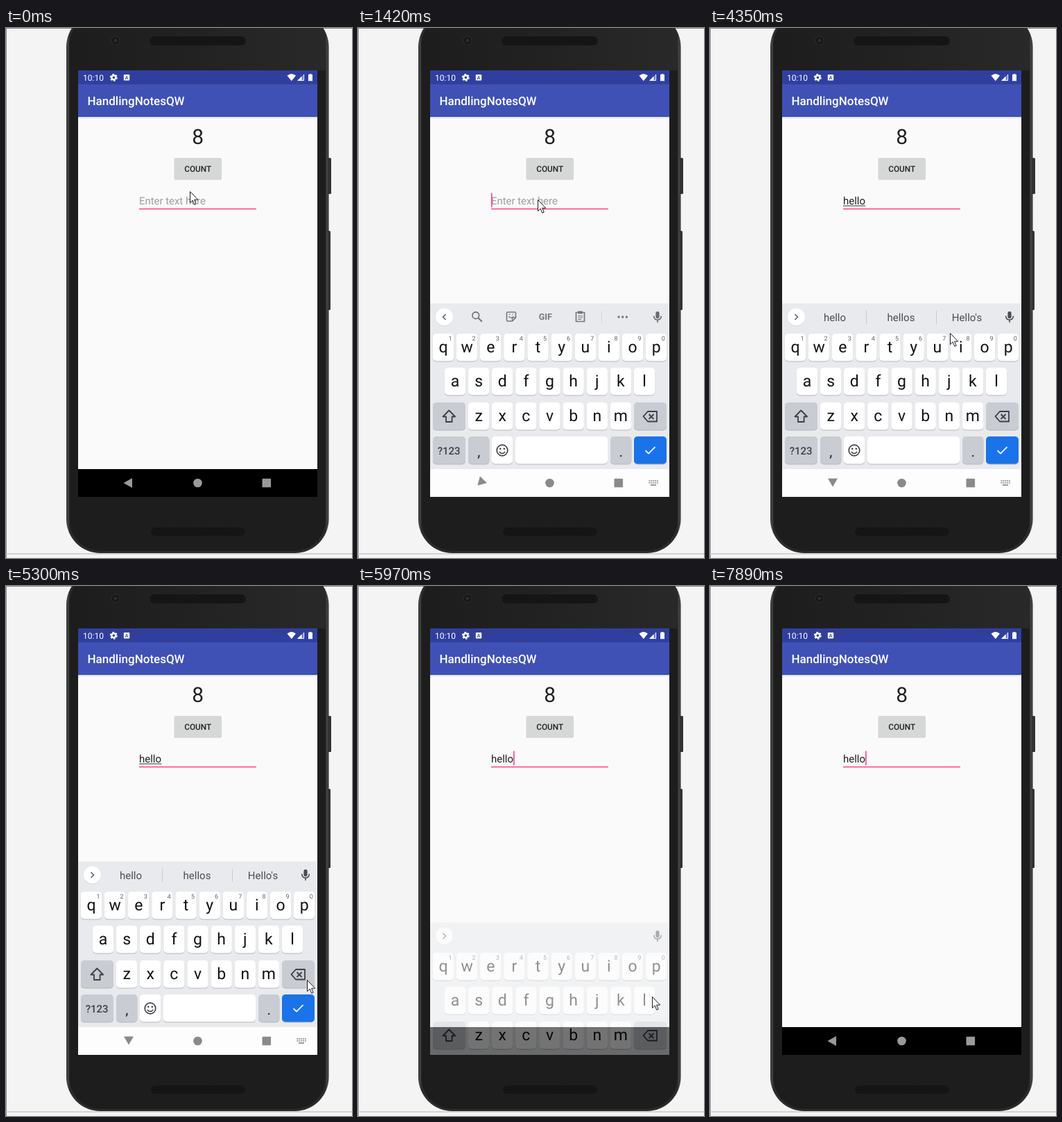
Write an HTML page that moves like this. It is 499 by 763 pixels and loops after 7990 ms.

```html
<!DOCTYPE html>
<html lang="en">
<head>
<meta charset="utf-8">
<title>Text entry on a phone</title>
<style>
  html, body { margin: 0; width: 100%; height: 100%; overflow: hidden; background: #f4f4f4; }
  svg { display: block; width: 499px; height: 763px; }
  text { font-family: Roboto, "Noto Sans", sans-serif; text-rendering: geometricPrecision; white-space: pre; }
  .mid { text-anchor: middle; }
  .bold { font-weight: 500; }
  .line { fill: none; stroke-linejoin: round; }
</style>
</head>
<body>
<svg viewBox="0 0 499 763" xmlns="http://www.w3.org/2000/svg">
  <defs>
    <linearGradient id="shell" x1="0" y1="0" x2="1" y2="0">
      <stop offset="0" stop-color="#2b2d2d"/>
      <stop offset=".006" stop-color="#454848"/>
      <stop offset=".012" stop-color="#2a2c2c"/>
      <stop offset=".988" stop-color="#2a2c2c"/>
      <stop offset=".994" stop-color="#454848"/>
      <stop offset="1" stop-color="#2b2d2d"/>
    </linearGradient>
    <linearGradient id="face" x1="0" y1="0" x2="1" y2="0">
      <stop offset="0" stop-color="#1d1d1d"/>
      <stop offset=".4" stop-color="#212121"/>
      <stop offset="1" stop-color="#292929"/>
    </linearGradient>
    <linearGradient id="drop" x1="0" y1="0" x2="0" y2="1">
      <stop offset="0" stop-color="#000" stop-opacity=".12"/>
      <stop offset="1" stop-color="#000" stop-opacity="0"/>
    </linearGradient>
    <pattern id="mesh" width="4" height="4" patternUnits="userSpaceOnUse">
      <rect width="4" height="4" fill="#1b1b1b"/>
      <circle cx="1" cy="1" r=".9" fill="#080808"/>
      <circle cx="3" cy="3" r=".9" fill="#080808"/>
    </pattern>
    <clipPath id="screen"><rect x="104" y="61" width="345" height="614"/></clipPath>
  </defs>

  <rect width="499" height="763" fill="#f4f4f4"/>
  <path d="M0 .5H499M.5 0V763" stroke="#8c8c8c"/>
  <path d="M0 757H499" stroke="#c9c9c9" stroke-width="1.5"/>

  <g id="phone">
    <rect x="463" y="187" width="6" height="52" rx="1.5" fill="#333"/>
    <rect x="463" y="292" width="5" height="114" rx="1.5" fill="#333"/>
    <rect x="87" y="-22" width="378.5" height="778" rx="49" fill="url(#shell)"/>
    <rect x="91.5" y="-18" width="369.5" height="771" rx="45" fill="#1d1d1d"/>
    <path d="M91.5 61V22Q92 10 99 0H454Q461 10 461 22V61Z" fill="url(#face)"/>
    <rect x="207" y="12" width="139" height="13" rx="6.5" fill="url(#mesh)"/>
    <rect x="209" y="719" width="136" height="12" rx="6" fill="url(#mesh)"/>
    <circle cx="158" cy="18" r="6" fill="#161616" stroke="#303030"/>
    <circle cx="158" cy="18" r="2.5" fill="#2b2d31"/>
  </g>

  <g clip-path="url(#screen)">
    <rect x="104" y="61" width="345" height="614" fill="#fafafa"/>
    <rect x="104" y="128" width="345" height="3" fill="url(#drop)"/>
    <rect x="104" y="61" width="345" height="20" fill="#303f9f"/>
    <rect x="104" y="81" width="345" height="47" fill="#3f51b5"/>

    <g fill="#fff">
      <text x="111" y="76" font-size="12">10:10</text>
      <circle cx="155.3" cy="71.3" r="3" fill="none" stroke="#fff" stroke-width="2.4"/>
      <circle cx="155.3" cy="71.3" r="4.6" fill="none" stroke="#fff" stroke-width="1.8" stroke-dasharray="2.41 2.41"/>
      <rect x="169.8" y="67" width="8.4" height="8.4" rx="1"/>
      <text class="mid bold" x="174" y="74" font-size="7.5" fill="#303f9f">A</text>
      <path d="M405.5 68.6Q411.8 63.6 418 68.6L411.8 76.2Z"/>
      <path d="M430 66V76H420Z" opacity=".35"/>
      <path d="M426.5 69.5V76H420Z"/>
      <path class="line" d="M429.6 67V75.6H421" stroke="#fff" stroke-width=".9"/>
      <path d="M437.6 66H440.4V67H442V76.2H436V67H437.6Z"/>
      <text class="bold" x="117.5" y="111" font-size="17">HandlingNotesQW</text>
    </g>

    <text class="mid" x="276.7" y="167" font-size="30" fill="#212121">8</text>
    <rect x="242.5" y="187.5" width="68.5" height="31" rx="2" fill="#000" opacity=".16"/>
    <rect x="243" y="187" width="67.5" height="30" rx="1.5" fill="#d6d7d7"/>
    <text class="mid bold" x="276.7" y="207" font-size="11.8" fill="#212121">COUNT</text>

    <text id="hint" x="192" y="254" font-size="14.9" fill="#9c9c9c">Enter text here</text>
    <text id="entry" x="192" y="254" font-size="15" fill="#212121"></text>
    <path id="compose" stroke="#333" stroke-width="1"/>
    <path d="M192 260.5H361" stroke="#ff4081" stroke-width="1.3"/>
    <rect id="caret" y="237.5" width="1.6" height="20.5" fill="#ff4081"/>

    <rect x="104" y="635" width="345" height="40" fill="#000"/>
    <g id="darkNav" fill="#9a9a9a"></g>
    <g id="board"></g>
  </g>
  <path id="mouse" d="M.5 .5V16.6L4.2 13.1L6.8 19.3L9.2 18.2L6.6 12.2H11.7Z" fill="#fff" stroke="#1c1c28" stroke-width="1" stroke-linejoin="round"/>
</svg>

<script>
const LOOP = 7990;
const $ = id => document.getElementById(id);
const show = (id, on) => $(id).setAttribute('display', on ? 'inline' : 'none');

// Held values: each entry is [start time, ...value].
const mousePath = [
  [0, 265, 235], [120, 259, 247],
  [4350, 346, 439], [4500, 373, 478], [4630, 404, 524], [4750, 425, 555], [4870, 434, 567],
  [5420, 424, 591],
  [6680, 400, 616], [6800, 410, 634], [6930, 428, 662], [7060, 449, 695],
  [7180, 470, 727], [7300, 488, 750], [7490, 520, 790]
];
const caretOn = [
  [0, 0], [490, 1], [990, 0], [1150, 1], [2000, 0], [2280, 1], [4350, 0], [4870, 1],
  [5300, 0], [5700, 1], [6370, 0], [6890, 1], [7390, 0], [7890, 1]
];
const typed = [[0, ''], [2280, 'h'], [2420, 'he'], [2700, 'hel'], [3260, 'hell'], [3540, 'hello']];
const words = [
  [0], [2420, 'he', 'hi', 'hey'], [2700, 'he', 'hey', 'hello'], [2950, 'hel', 'help', 'hello'],
  [3790, 'hello', 'hellos', 'Hello\'s'], [5700, '', '', '']
];
// Keyboard drop in px and opacity.
const slide = [[0, 280, 0], [1150, 170, .28], [1280, 87.5, .68], [1420, 0, 1], [5940, 88, .45], [6090, 280, 0]];
const backTurn = [[0, 0], [1420, -45], [1540, -90]];

function held(track, t) {
  let now = track[0];
  for (const step of track) if (step[0] <= t) now = step;
  return now.slice(1);
}

const rect = (x, y, w, h, fill, r = 0) =>
  `<rect x="${x}" y="${y}" width="${w}" height="${h}" rx="${r}" fill="${fill}"/>`;
const label = (s, x, y, size, fill, cls = '') =>
  `<text class="mid ${cls}" x="${x}" y="${y}" font-size="${size}" fill="${fill}">${s}</text>`;
const line = (d, color, w = 1.7) =>
  `<path class="line" d="${d}" stroke="${color}" stroke-width="${w}"/>`;
const key = (x, y, w, fill = '#fff') =>
  rect(x, y + 1, w, 39.5, '#b4b7bc', 5) + rect(x, y, w, 39.5, fill, 5);

function letters(row, x, y, base, digits) {
  return [...row].map((c, i) => {
    const cx = x + i * 34.13;
    const hint = digits ? label((i + 1) % 10, cx + 10, y + 10, 9, '#5f6368') : '';
    return key(cx - 15.2, y, 30.4) + label(c, cx, base, 23, '#111') + hint;
  }).join('');
}

function keys() {
  const soft = '#c9ccd3', ink = '#3c4043';
  return letters('qwertyuiop', 123, 440, 467, true) +
    letters('asdfghjkl', 140, 489, 516) +
    letters('zxcvbnm', 174.1, 539, 565.5) +
    key(108, 539, 47, soft) + key(398, 539, 47, soft) +
    line('M131.3 550.5L122.5 559.5H127V567H135.6V559.5H140.1Z', ink, 1.8) +
    line('M418 552H431V566.5H418L411.5 559.2Z', ink, 1.8) +
    line('M419.5 556L426.5 563M426.5 556L419.5 563', ink, 1.8) +
    key(108, 588, 47, soft) + label('?123', 131.2, 613.5, 15, ink, 'bold') +
    key(159, 588, 30.4, soft) + label(',', 174.2, 617, 21, '#222') +
    key(193, 588, 30.4) +
    `<circle cx="208" cy="608" r="7.8" fill="none" stroke="${ink}" stroke-width="1.7"/>
     <circle cx="205.2" cy="605.8" r="1.3" fill="${ink}"/><circle cx="210.8" cy="605.8" r="1.3" fill="${ink}"/>` +
    line('M203.7 610Q208 615 212.3 610', ink, 1.5) +
    key(227, 588, 133) +
    key(364, 588, 30.4, soft) + label('.', 379.2, 617, 21, '#222') +
    key(398, 588, 47, '#1a73e8') +
    line('M414.5 608.2L419 612.7L428.5 603.2', '#fff', 1.7);
}

function tools() {
  const ink = '#74787d';
  return `<g id="tools">
    <circle cx="169.8" cy="413.8" r="4.8" fill="none" stroke="${ink}" stroke-width="1.8"/>` +
    line('M173.3 417.3L178.8 422.8', ink, 2.1) +
    line('M216 409H226Q227.5 409 227.5 410.5V417L222.5 422H216Q214.5 422 214.5 420.5V410.5Q214.5 409 216 409Z', ink, 1.6) +
    line('M222.5 422V417H227.5M217.5 415.3Q221 419 224.5 415.3M218 412.4H219.5M222.5 412.4H224', ink, 1.4) +
    `<g font-weight="700">${label('GIF', 270.3, 420, 12.5, ink)}</g>` +
    line('M314.5 409.5H326.5V422.5H314.5Z', ink, 1.7) +
    rect(317, 407.5, 7, 4, ink, 1) +
    line('M317.2 414.5H324M317.2 417H324M317.2 419.5H322', ink, 1.2) +
    line('M351.5 407V425', '#d5d8dc', 1) +
    [376, 381.7, 387.4].map(x => `<circle cx="${x}" cy="416" r="1.7" fill="${ink}"/>`).join('') +
    '</g>';
}

const navShapes = '<circle cx="276.5" cy="655" r="6.3"/><rect x="369.5" y="648.8" width="12.6" height="12.4" rx="1"/>';

function lightNav() {
  let dots = '';
  for (let r = 0; r < 2; r++)
    for (let c = 0; c < 5; c++) dots += rect(419.5 + c * 2.9, 651 + r * 2.9, 1.8, 1.8, '#8f8f8f');
  return rect(104, 635, 345, 40, '#fdfdfd') +
    `<g fill="#8a8a8a"><path id="back" d="M170.5 654L182.5 647V661Z"/>${navShapes}</g>
     <g id="switcher">${dots}${rect(422, 657, 8, 1.8, '#8f8f8f')}</g>`;
}

$('darkNav').innerHTML = `<path d="M169.5 655L182 648V662Z"/>${navShapes}`;
$('board').innerHTML =
  rect(104, 396.5, 345, 239, '#e8eaed') + keys() +
  '<circle cx="124.5" cy="416.8" r="12.7" fill="#000" opacity=".08"/><circle cx="124.5" cy="416" r="12.5" fill="#fff"/>' +
  '<path id="chevron" class="line" stroke="#5f6368" stroke-width="1.7"/>' +
  tools() +
  '<g id="bars">' + line('M225.5 407V426M326.5 407V426', '#c6c9ce', 1) + '</g>' +
  [180, 275.5, 370.5].map((x, i) =>
    `<text id="word${i}" class="mid" x="${x}" y="422" font-size="15" fill="#4a4d51"></text>`).join('') +
  `<g id="mic">${rect(429.4, 408, 5.2, 10, 'currentColor', 2.6)}` +
  line('M426.7 414.5Q426.7 420 432 420Q437.3 420 437.3 414.5M432 420V424', 'currentColor', 1.6) + '</g>' +
  lightNav();

function draw(t) {
  const [mx, my] = held(mousePath, t);
  $('mouse').setAttribute('transform', `translate(${mx} ${my})`);

  const [text] = held(typed, t);
  const entry = $('entry');
  entry.textContent = text;
  show('hint', !text);
  const end = 192 + (text ? entry.getComputedTextLength() : 0);
  $('caret').setAttribute('x', end);
  show('caret', held(caretOn, t)[0]);
  $('compose').setAttribute('d', `M192 256H${end}`);
  show('compose', text && t < 5940);

  const [drop, alpha] = held(slide, t);
  $('board').setAttribute('transform', `translate(0 ${drop})`);
  $('board').setAttribute('opacity', alpha);
  show('board', alpha);
  show('darkNav', !alpha);

  const picks = held(words, t);
  const typing = picks.length > 0;
  for (let i = 0; i < 3; i++) $('word' + i).textContent = picks[i] || '';
  show('bars', typing && picks[0]);
  show('tools', !typing);
  $('mic').setAttribute('color', typing ? '#4a4d51' : '#66696e');
  $('chevron').setAttribute('d', typing ? 'M122.5 412L126.5 416L122.5 420' : 'M126.5 412L122.5 416L126.5 420');

  $('back').setAttribute('transform', `rotate(${held(backTurn, t)[0]} 177 654)`);
  show('switcher', t < 5820);
}

const start = performance.now();
function tick() {
  draw((performance.now() - start) % LOOP);
  requestAnimationFrame(tick);
}
tick();
</script>
</body>
</html>
```
